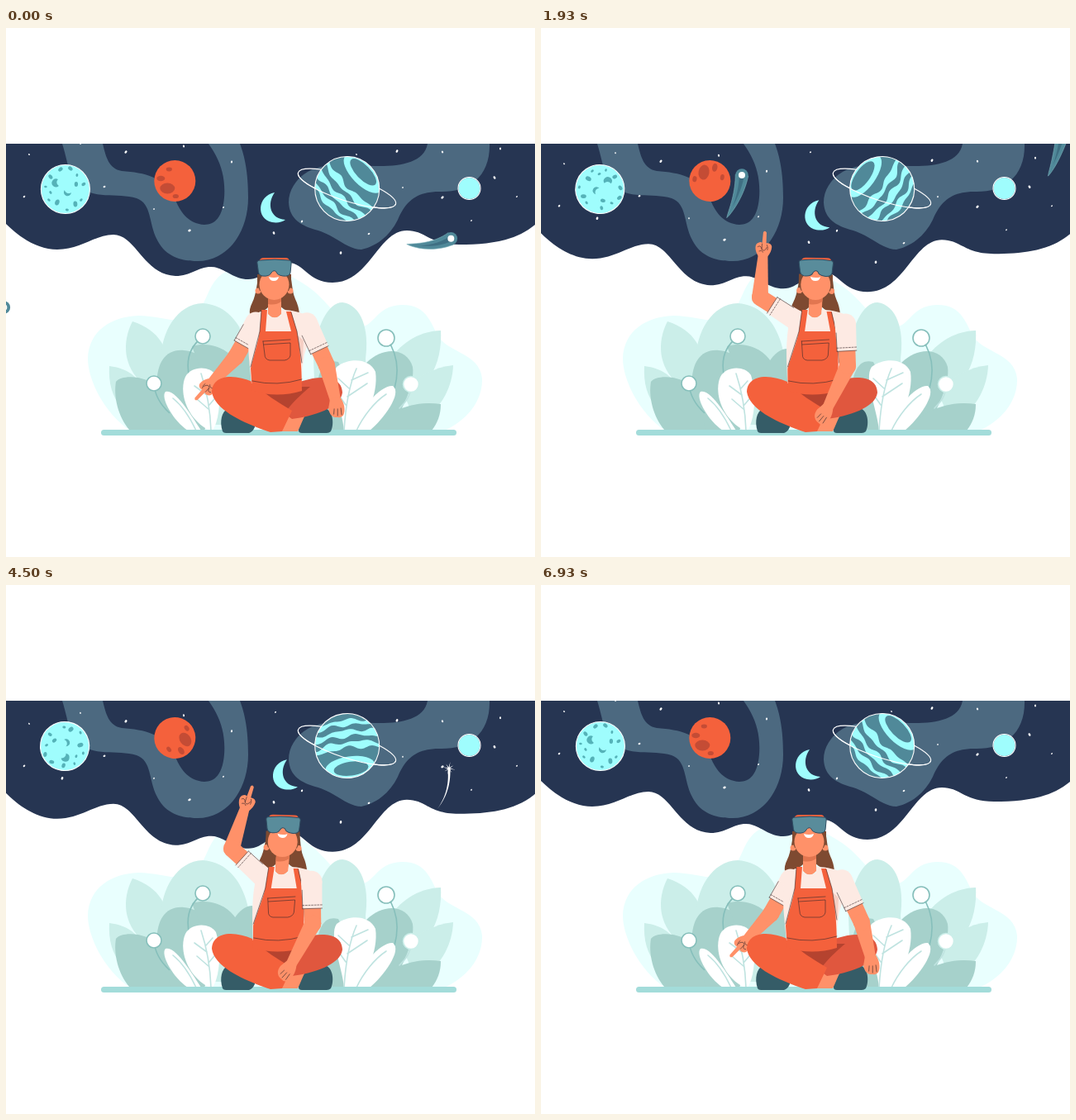
An HTML page for the animation above (7000 ms loop, 640x640 px).

```html
<!DOCTYPE html>
<html lang="en">
<head>
<meta charset="utf-8">
<title>Virtual space</title>
<style>
html, body { margin: 0; width: 100%; height: 100%; overflow: hidden; background: #fff; }
svg { display: block; width: 100vw; height: 100vh; }
.pale { fill: #e9fffe; }
.light { fill: #cbeee9; }
.mid { fill: #a6d1cb; }
.white { fill: #fff; }
.cyan { fill: #9ffdfd; }
.sky { fill: #263552; }
.swirl { fill: #4c6980; }
.skin { fill: #ff9169; }
.shirt { fill: #fdeae3; }
.red { fill: #f4613c; }
.hair { fill: #7e4a31; }
.vein { fill: none; stroke: #bfe3e0; stroke-width: 1.6; stroke-linecap: round; }
.stem { fill: none; stroke: #86bfbb; stroke-width: 1.6; }
.ink { fill: none; stroke: #3a2a2c; stroke-width: .6; stroke-linecap: round; stroke-linejoin: round; }
.rim { fill: none; stroke: #fff; stroke-width: 1.1; }
</style>
</head>
<body>
<svg viewBox="0 0 640 640" preserveAspectRatio="xMidYMid meet">
<defs>
  <clipPath id="scene"><rect y="140" width="640" height="500"/></clipPath>
  <clipPath id="disc"><circle r="39"/></clipPath>
</defs>
<g clip-path="url(#scene)">
  <path class="pale" d="M150 487C118 465 99 425 99 400C100 366 128 349 160 348C190 348 212 362 230 346C246 330 244 300 274 292C310 284 345 296 372 318C398 340 405 362 428 362C446 361 448 336 478 335C504 334 512 350 521 370C532 393 573 392 576 424C577 452 556 476 530 487Z"/>

  <path id="edge" class="sky" d="M0 100V237C16 253 38 268 62 268C90 268 108 250 130 250C157 250 166 298 205 300C224 300 232 289 248 289C264 289 274 304 293 304C312 304 322 284 342 284C360 284 366 308 395 308C440 308 450 245 485 245C508 245 512 262 548 262C584 262 616 258 640 238V100Z"/>

  <path class="swirl" d="M68 140C74 158 76 180 86 190C104 208 135 199 158 206C180 214 170 244 190 267C203 281 222 282 232 282C266 282 293 250 293 205C293 175 289 156 283 140H245C258 158 266 178 264 205C262 230 252 238 240 238C222 237 212 225 205 208C192 180 168 175 140 173C124 170 121 156 117 140Z"/>
  <path class="swirl" d="M510 140C506 162 480 167 452 167C420 168 392 160 365 174C350 183 342 197 342 211C343 232 358 239 374 244C398 250 412 268 430 268C448 264 464 252 474 232C484 208 498 198 524 198C560 199 586 180 585 140Z"/>
  <g id="stars" class="white"></g>

  <g id="moonPlanet"><circle class="cyan" r="29.5"/><circle class="rim" r="29.5"/>
    <g id="craters" fill="#55b2b8"></g>
    <path fill="#55b2b8" d="M-9-12A5 5 0 1 0-8-4A5 5 0 0 1-9-12ZM-1 1A4.5 4.5 0 1 0 7 4A5 5 0 0 1-1 1Z"/>
  </g>
  <g id="redPlanet"><circle class="red" r="25"/>
    <g fill="#c44c35"><ellipse cx="-9" cy="9" rx="9" ry="6.5"/><ellipse cx="-17" cy="-3" rx="5" ry="3.2"/><ellipse cx="-7" cy="-14" rx="3.6" ry="2.4"/><ellipse cx="1" cy="18.5" rx="3.6" ry="2.6"/></g>
  </g>
  <ellipse class="rim" cx="412.5" cy="194" rx="62" ry="15" transform="rotate(18 412.5 194)"/>
  <g id="bandPlanet">
    <circle r="39" fill="#508999"/>
    <g id="bands" class="cyan" clip-path="url(#disc)">
      <ellipse cy="-26" rx="30" ry="13"/>
      <ellipse cx="-1" cy="-28" rx="21" ry="8.5" fill="#508999"/>
    </g>
    <circle class="rim" r="39"/>
  </g>
  <path class="rim" d="M-62 0A62 15 0 0 0 62 0" transform="translate(412.5 194) rotate(18)"/>
  <circle class="cyan" cx="560.5" cy="194" r="13"/><circle class="rim" cx="560.5" cy="194" r="13.5"/>
  <path id="crescent" class="cyan" d="M325 199C304 203 302 231 322 235C328 236 334 235 338 232C320 231 315 213 325 199Z"/>
  <g id="flyers"></g>

  <g class="light">
    <path d="M153 355C185 365 200 390 195 420L165 430C142 410 140 380 153 355Z"/>
    <path d="M125 409C150 412 165 425 170 450L140 460C128 445 124 430 125 409Z"/>
    <path d="M188 410C184 375 204 334 238 333C270 335 288 362 294 395V480H190Z"/>
    <path d="M372 400C375 360 390 332 407 332C430 335 440 365 435 400L440 480H375Z"/>
    <path d="M526 366C528 400 515 435 480 450L456 420C466 388 495 367 526 366Z"/>
    <path d="M541 408C540 440 520 470 495 475L480 440C500 420 520 410 541 408Z"/>
  </g>
  <g class="mid">
    <path d="M133 428C140 418 175 420 190 440C215 460 225 487 225 487H150C135 470 130 445 133 428Z"/>
    <path d="M183 440C180 410 190 388 215 390C240 392 255 415 258 440L240 487H200Z"/>
    <path d="M225 385C250 378 275 390 284 415L300 450L245 440Z"/>
    <path d="M268 430C270 405 285 388 298 388L310 440Z"/>
    <path d="M375 440C378 412 386 400 402 404L420 440V487H380Z"/>
    <path d="M436 405C456 385 485 386 492 410C495 430 480 460 465 487H420Z"/>
    <path d="M526 455C526 468 522 478 515 487H440C460 465 490 450 526 455Z"/>
  </g>
  <path class="stem" d="M238 374C222 385 217 402 222 424M179 430C180 445 188 457 198 466M460 375C474 394 476 414 470 436"/>
  <path class="vein" d="M490 431C490 445 484 452 476 460"/>
  <g class="white" stroke="#86bfbb" stroke-width="1.6">
    <circle cx="238" cy="373" r="9"/><circle cx="179" cy="430" r="9"/><circle cx="460" cy="375" r="10"/>
    <circle cx="490" cy="431" r="9.5" stroke="#cbeee9"/>
  </g>
  <g class="white">
    <path d="M246 487C218 472 209 440 217 422C224 409 246 408 254 420C260 440 260 470 250 487Z"/>
    <path d="M236 487C220 462 204 437 193 440C186 447 203 476 220 487Z"/>
    <path d="M409 487C407 462 390 424 400 410C416 398 440 400 447 416C451 444 434 474 424 487Z"/>
    <path d="M420 487C428 462 452 432 468 433C480 442 456 474 440 487Z"/>
  </g>
  <path class="vein" d="M248 487C247 460 242 436 236 418M246 462L231 449M243 444L228 433M246 456L256 444M242 436L250 427M230 487C222 470 212 456 202 448M409 487C411 455 416 430 424 412M411 456L404 446M415 436L402 424M413 446L437 430M418 426L438 417M424 487C432 470 446 452 460 443"/>
  <path d="M118.500 489.500H541.500" stroke="#a3dcda" stroke-width="7" stroke-linecap="round"/>

  <g id="hairBack" class="hair"><path d="M307 293C303 310 303 322 298 332Q294 340 295 346Q312 345 319 336H331Q340 345 355 346Q354 336 350 328C345 316 347 305 342 293Z"/></g>
  <g id="leftArm"></g>
  <g fill="#355c67"><path d="M262 488C258 476 261 464 268 461L300 472C304 480 300 488 294 490H266Q263 490 262 488Z"/><path d="M354 487C352 480 358 470 365 464L388 461C396 465 397 480 393 488Q391 490 388 490H358Q354 490 354 487Z"/></g>
  <path class="skin" d="M330 488L345 465L362 468C358 476 356 482 353 488Z"/>
  <path fill="#e0573e" d="M340 436C356 424 406 412 407 441C405 459 372 470 346 473L312 448Z"/>
  <path fill="#b5432f" d="M300 434H368C356 444 346 454 340 462Z"/>
  <path class="red" d="M298 428C278 419 250 418 249 440C252 464 296 481 320 489L334 488L346 463C330 453 312 443 298 428Z"/>

  <g id="torso">
    <path class="skin" d="M317 326H333V346Q325 355 317 346Z"/>
    <path fill="#e27650" d="M317 327H333V331Q326 336 317 334Z"/>
    <path class="shirt" d="M317 341C308 343 299 345 295 352C291 380 294 400 297 430H356L361 395C367 378 370 362 366 349C358 344 346 341 333 341V348Q325 353 317 348Z"/>
    <path fill="#f6cfc4" d="M353 372L360 378L359 400L356 410Z"/>
    <path class="red" d="M309 341L316 341L314 367H345L339 343L345 343L352 367C355 385 358 405 358 439Q328 448 298 439L296 412C300 395 305 380 307 367Z"/>
    <path class="ink" d="M309 342L307 367L296 410M345 344L352 367L358 405M311 379L344 377M312 383L344 381V396Q343 401 337 402H319Q313 401 313 395L311 379M298 427Q328 434 358 425"/>
  </g>
  <g id="head">
    <circle class="skin" cx="305" cy="318" r="3.5"/><circle class="skin" cx="344" cy="318" r="3.5"/>
    <path class="hair" d="M304 298H345V310L342 318H307L304 310Z"/>
    <ellipse class="skin" cx="324.500" cy="310.500" rx="18" ry="18.500"/>
    <path class="red" d="M306 283Q307 278 312 278H338Q343 278 343 283Z"/>
    <path d="M304 285Q303 281 308 281Q325 279 342 281Q346 281 345 286L344 296Q343 301 335 300Q328 299 327 295Q324 292 321 296Q319 301 310 300Q305 299 305 292Z" fill="#598c9b" stroke="#304e63" stroke-width="1"/>
    <path class="white" d="M318 301Q324 303 330 301Q329 306 324 306Q319 306 318 301Z"/>
  </g>
  <g id="rightArm"></g>
</g>
</svg>
<script>
const $ = id => document.getElementById(id);
const FRAMES = 98, LOOP = 7000, STEP = LOOP / FRAMES, SPAN = STEP * (FRAMES - 1);
const set = (id, transform) => $(id).setAttribute("transform", transform);
const mix = (a, b, k) => a.map((v, i) => v + (b[i] - v) * k);
const fix = n => n.toFixed(2);
const poly = pts => "M" + pts.map(p => fix(p[0]) + " " + fix(p[1])).join("L") + "Z";

// Smooth monotone interpolation through rows of [time, ...values].
function track(rows) {
  const secant = (i, c) => (rows[i + 1][c] - rows[i][c]) / (rows[i + 1][0] - rows[i][0]);
  const slope = (i, c) => {
    if (i === 0 || i === rows.length - 1) return 0;
    const a = secant(i - 1, c), b = secant(i, c);
    return a * b <= 0 ? 0 : 2 * a * b / (a + b);
  };
  return t => {
    let i = 0;
    while (i < rows.length - 2 && t > rows[i + 1][0]) i++;
    const h = rows[i + 1][0] - rows[i][0];
    const u = Math.max(0, Math.min(1, (t - rows[i][0]) / h)), v = 1 - u;
    return rows[i].slice(1).map((p, k) => {
      const c = k + 1;
      return p * v * v * (1 + 2 * u) + rows[i + 1][c] * u * u * (3 - 2 * u)
        + h * (slope(i, c) * u * v * v - slope(i + 1, c) * u * u * v);
    });
  };
}

const route = d => {
  const path = document.createElementNS("http://www.w3.org/2000/svg", "path");
  path.setAttribute("d", d);
  return path;
};

// Elbow x, y, forearm angle from upright, forearm length.
const leftPose = track([
  [0, 278, 398, -137, 50], [1210, 260, 348, -26, 63], [1930, 265, 326, 4, 59],
  [3210, 277, 315, 21, 58], [3465, 277.5, 315, 22, 58], [4500, 273, 319, 18, 59],
  [5710, 258, 346, -15.6, 63], [SPAN, 278, 398, -137, 50]
]);
// Elbow x, y, hand x, y.
const rightPose = track([
  [0, 388, 408, 400, 456], [1210, 373, 408, 356, 463],
  [1930, 371, 409, 344, 465], [SPAN / 2, 372, 411, 340, 463]
]);

const comets = [
  { path: route("M478 260C505 267 525 262 538 255C580 236 601 205 615 176C630 145 635 110 650 40"),
    at: track([[0, 62], [1210, 176], [1930, 226], [3210, 257], [3900, 290]]), end: 3900 },
  { path: route("M-70 330C-45 336-25 338-3 338C50 338 130 328 182 282C225 241 240 205 243 178C246 150 262 125 272 40"),
    at: track([[0, 68], [1210, 265], [1930, 388], [3210, 462], [3900, 500]]), end: 3900 }
];
const meteors = [
  { path: route("M262 145C230 188 214 215 215 249C215 262 217 276 220 290"),
    at: track([[2600, 0], [3210, 115], [3700, 150]]), tail: 74, from: 2600, to: 3700 },
  { path: route("M448 353C490 335 512 300 521 272C532 258 537 242 536 224C535 205 530 195 524 185"),
    at: track([[2900, 0], [3210, 28], [4500, 166], [5000, 205]]), tail: 52, from: 2900, to: 5000 }
];

const starSpots = "28 153 22 204 68 219 90 140 119 192 145 150 179 219 215 143 222 245 263 217 273 162 324 248 326 139 358 234 405 272 424 153 439 249 473 149 480 193 528 150 528 205 563 233 598 146 591 181 618 204"
  .split(" ").map(Number);
for (let i = 0; i < starSpots.length; i += 2) {
  const [x, y] = starSpots.slice(i, i + 2), r = .8 + (i % 6) * .13;
  $("stars").innerHTML += `<ellipse cx="${x}" cy="${y}" rx="${r}" ry="${r * 1.4}" transform="rotate(${i * 37 % 100 - 30} ${x} ${y})"/>`;
}
const pits = [[-18, -15, 3], [-6, -24, 3], [6, -25, 3], [14, -17, 2], [22, -6, 2.6], [13, -6, 3],
  [-18, 4, 2], [-24, -3, 1.8], [-10, 16, 3.6], [12, 18, 3.4], [-20, 13, 2], [19, 13, 2], [2, 25, 2]];
$("craters").innerHTML = pits.map(([x, y, r]) =>
  `<ellipse cx="${x}" cy="${y}" rx="${r}" ry="${r * .72}" transform="rotate(${x * 7} ${x} ${y})"/>`).join("");

// Wavy band that bows across the disc.
function band(y, thick) {
  const top = [], bottom = [];
  for (let x = -40; x <= 40; x += 2) {
    const mid = y + 5 * (1 - (x / 39) ** 2) + 1.3 * Math.sin(x / 4 + y);
    const half = thick / 2 * (1 + .4 * Math.sin(x / 6 + 2 * y));
    top.push([x, mid - half]);
    bottom.unshift([x, mid + half]);
  }
  return `<path d="${poly(top.concat(bottom))}"/>`;
}
$("bands").innerHTML += band(-4, 7) + band(10, 7) + band(23, 6);

// Outline of a shape that follows a route, with a half width for each k in 0..1.
function ribbon(path, from, to, width) {
  const left = [], right = [], n = 14;
  for (let i = 0; i <= n; i++) {
    const s = from + (to - from) * i / n;
    const p = path.getPointAtLength(s), q = path.getPointAtLength(s + 1), o = path.getPointAtLength(s - 1);
    const dx = q.x - o.x, dy = q.y - o.y, len = Math.hypot(dx, dy) || 1, w = width(i / n);
    left.push([p.x - dy / len * w, p.y + dx / len * w]);
    right.unshift([p.x + dy / len * w, p.y - dx / len * w]);
  }
  return poly(left.concat(right));
}

function comet({ path, at, end }, t) {
  if (t > end) return "";
  const s = at(t)[0], head = path.getPointAtLength(s);
  const body = ribbon(path, Math.max(0, s - 55), s, k => 7.8 * k ** .75);
  const core = ribbon(path, Math.max(0, s - 40), s, k => 3 * k);
  return `<g fill="#508999"><path d="${body}" stroke="#7fb4bd" stroke-width=".6"/><circle cx="${head.x}" cy="${head.y}" r="7.8"/></g>
    <path d="${core}" fill="#3f6f83"/><circle class="white" cx="${head.x}" cy="${head.y}" r="4"/>`;
}

function meteor({ path, at, tail, from, to }, t) {
  if (t < from || t > to) return "";
  const s = at(t)[0], p = path.getPointAtLength(s), rays = [];
  for (let i = 0; i < 16; i++) {
    const r = i % 2 ? 1.3 : i % 4 ? 6.5 : 8, a = i * Math.PI / 8 + .2;
    rays.push([p.x + r * Math.cos(a), p.y + r * Math.sin(a)]);
  }
  const fade = Math.min(1, (to - t) / 300);
  return `<g class="white" opacity="${fade}"><path d="${ribbon(path, Math.max(0, s - tail), s, k => 1.5 * k)}"/><path d="${poly(rays)}"/></g>`;
}

// Tapered limb section with optional round ends.
function limb(a, b, ra, rb, cls, round = true) {
  const dx = b[0] - a[0], dy = b[1] - a[1], len = Math.hypot(dx, dy) || 1, nx = -dy / len, ny = dx / len;
  const side = (p, r) => [p[0] + nx * r, p[1] + ny * r];
  const dot = (p, r) => `<circle cx="${p[0]}" cy="${p[1]}" r="${r}"/>`;
  return `<g class="${cls}"><path d="${poly([side(a, ra), side(b, rb), side(b, -rb), side(a, -ra)])}"/>${dot(a, ra)}${round ? dot(b, rb) : ""}</g>`;
}

function sleeve(s, e, cut, r) {
  const c = mix(s, e, cut), dx = e[0] - s[0], dy = e[1] - s[1], len = Math.hypot(dx, dy);
  const nx = -dy / len * r, ny = dx / len * r, hem = mix(s, e, cut - .08);
  const line = (p, q) => `M${p[0]} ${p[1]}L${q[0]} ${q[1]}`;
  const off = (p, k) => [p[0] + nx * k, p[1] + ny * k];
  return limb(s, c, r + 1, r, "shirt", false)
    + `<path class="ink" d="${line(off(c, 1), off(c, -1))}${line(off(mix(s, e, .2), 1), off(c, 1))}"/>`
    + `<path class="ink" stroke-dasharray="2 1.6" d="${line(off(hem, 1), off(hem, -1))}"/>`;
}

function drawLeftArm(t, e) {
  const [ex, ey, angle, len] = leftPose(t), a = angle * Math.PI / 180;
  const shoulder = [302 + 10 * e, 356 - 4 * e], elbow = [ex, ey];
  const hand = [ex + len * Math.sin(a), ey - len * Math.cos(a)];
  return limb(shoulder, elbow, 10, 10, "skin") + limb(elbow, hand, 10, 5.2, "skin")
    + sleeve(shoulder, elbow, .66, 11.5)
    + `<g transform="translate(${hand}) rotate(${angle})">
      <path class="skin" d="M-5 10C-10 4-11-3-8-6Q-4-9-2-7L-1.500-20Q.5-23 2.500-20L3-7Q9-8 10-3Q10 4 5 10Z"/>
      <path class="ink" d="M-7-2Q-4-5-2 0M-2-6V1Q2 4 4-2M4-5Q6-2 5 1M-5 3Q-2 1 0 4"/></g>`;
}

function drawRightArm(t, e) {
  const [ex, ey, hx, hy] = rightPose(Math.min(t, SPAN - t));
  const shoulder = [364 + 7 * e, 357 + 2 * e], elbow = [ex, ey], hand = [hx, hy];
  const turn = Math.atan2(ex - hx, hy - ey) * 180 / Math.PI;
  return limb(shoulder, elbow, 11, 10, "skin") + limb(elbow, hand, 10, 6, "skin")
    + sleeve(shoulder, elbow, .64, 11.8)
    + `<g transform="translate(${hand}) rotate(${turn})">
      <path class="skin" d="M-6-9L6-9C10 0 9 9 5 14Q2 17-2 15Q-8 14-10 9Q-12 3-9-2Z"/>
      <path class="ink" d="M-6 10L-4 4M-2 13L0 5M3 13L4 5"/></g>`;
}

function draw(t) {
  const p = t / SPAN, e = ((1 - Math.cos(2 * Math.PI * p)) / 2) ** .92, lift = fix(18.3 * e);
  set("edge", `translate(0 ${lift})`);
  set("stars", `translate(0 ${lift})`);
  set("crescent", `translate(${fix(18.4 * e)} ${fix(15 * e)})`);
  set("moonPlanet", `translate(${fix(71.9 - e)} 195) rotate(${360 * p})`);
  set("redPlanet", `translate(204.3 185) rotate(${360 * p})`);
  set("bandPlanet", `translate(412.7 194.5) rotate(${46 - 360 * p})`);
  set("torso", `matrix(1 0 ${-.1 * e} 1 ${45 * e} 0)`);
  const nod = `translate(${fix(12.3 * e)} 0) rotate(${fix(2 * e)} 324 320)`;
  set("head", nod);
  set("hairBack", nod);
  $("flyers").innerHTML = comets.map(c => comet(c, t)).join("") + meteors.map(m => meteor(m, t)).join("");
  $("leftArm").innerHTML = drawLeftArm(t, e);
  $("rightArm").innerHTML = drawRightArm(t, e);
}

const start = performance.now();
let last = -1;
function tick() {
  // Steps fall on whole hundredths of a second, so round to the nearest one.
  const now = (performance.now() - start) % LOOP;
  const frame = Math.floor((now + 5) / STEP) % FRAMES;
  if (frame !== last) draw((last = frame) * STEP);
  requestAnimationFrame(tick);
}
tick();
</script>
</body>
</html>
```
